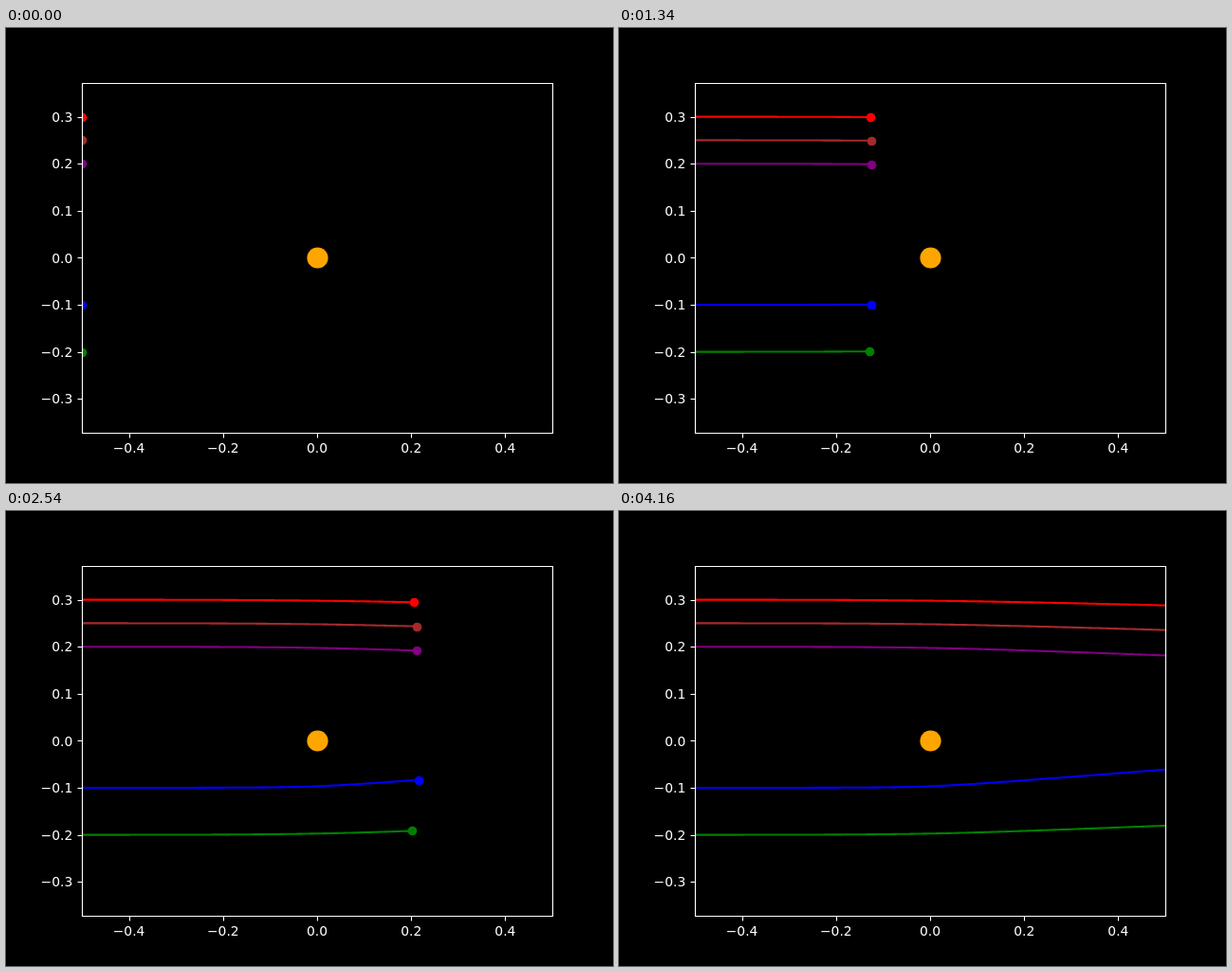
An HTML page that plays this animation: 640 px wide and 480 px high, repeating every 8710 ms.

```html
<!DOCTYPE html>
<html lang="en">
<head>
<meta charset="utf-8">
<title>Deflected particles</title>
<style>
  html, body { margin: 0; width: 100%; height: 100%; overflow: hidden; background: #000; }
  svg { display: block; width: 640px; height: 480px; }
  text { font: 13.889px "DejaVu Sans", sans-serif; fill: #fff; }
  .axes { fill: none; stroke: #fff; stroke-width: 1.11; }
  .trail { fill: none; stroke-width: 2.083; stroke-linejoin: round; stroke-linecap: square; }
</style>
</head>
<body>
<svg viewBox="0 0 640 480">
  <clipPath id="area"><rect x="80" y="58" width="496" height="369"/></clipPath>
  <g id="plot" clip-path="url(#area)"></g>
  <path id="frame" class="axes" d="M80.5 58.5H576.5V427.5H80.5Z"/>
  <g id="ticks"></g>
</svg>
<script>
const STEP = 20, LOOP = 8710, LAST = 208;
const SCALE = 496, X0 = 328, Y0 = 242.4, HALF = 0.5;

// Distance travelled in px at the key steps; b = start height, k = pull strength
const KEYS = [0, 39, 67, 88, 104, 127, 158, 190];
const particles = [
  { color: 'red',    b: 0.3,  k: 0.0042,  dist: [0, 108.1, 185.2, 242.4, 286, 350, 435.2, 523.4] },
  { color: 'green',  b: -0.2, k: 0.0042,  dist: [0, 108.1, 184.4, 241.5, 285, 348.2, 434, 522.2] },
  { color: 'blue',   b: -0.1, k: 0.00395, dist: [0, 108.3, 186.1, 246, 291.1, 355, 441, 529.4] },
  { color: 'purple', b: 0.2,  k: 0.00398, dist: [0, 108.3, 185.8, 244.3, 289, 353, 439, 527.4] },
  { color: 'brown',  b: 0.25, k: 0.00405, dist: [0, 108.2, 185.8, 244.3, 289, 353, 439, 527.4] }
];

const $ = id => document.getElementById(id);

function add(parent, name, attrs, text) {
  const el = document.createElementNS('http://www.w3.org/2000/svg', name);
  for (const key in attrs) el.setAttribute(key, attrs[key]);
  if (text) el.textContent = text;
  return parent.appendChild(el);
}

const snap = v => Math.floor(v + 0.5) + 0.5;
const label = v => v.toFixed(1).replace('-', '\u2212');

function travelled(dist, n) {
  let i = 1;
  while (i < KEYS.length - 1 && n > KEYS[i]) i++;
  const f = (n - KEYS[i - 1]) / (KEYS[i] - KEYS[i - 1]);
  return dist[i - 1] + (dist[i] - dist[i - 1]) * f;
}

// Path of a fast body bent slightly by a central inverse-square pull
function height(b, k, x) {
  const r0 = Math.hypot(HALF, b);
  return b - k / b * (Math.hypot(x, b) - r0 + (x + HALF) * HALF / r0);
}

function drawTicks() {
  const g = $('ticks');
  for (let i = -2; i <= 2; i++) {
    const x = X0 + i * 0.2 * SCALE;
    add(g, 'path', { class: 'axes', d: `M${snap(x)} 427.5v5` });
    add(g, 'text', { x, y: 448, 'text-anchor': 'middle' }, label(i * 0.2));
  }
  for (let i = -3; i <= 3; i++) {
    const y = Y0 - i * 0.1 * SCALE;
    add(g, 'path', { class: 'axes', d: `M80.5 ${snap(y)}h-5` });
    add(g, 'text', { x: 70.3, y: Math.round(y + 5.2), 'text-anchor': 'end' }, label(i * 0.1));
  }
}

function build() {
  const plot = $('plot');
  add(plot, 'circle', { cx: snap(X0), cy: snap(Y0), r: 11.1, fill: 'orange' });
  for (const p of particles) {
    p.points = [];
    for (let n = 0; n <= LAST; n++) {
      const px = 80 + travelled(p.dist, n);
      p.points.push([px, Y0 - SCALE * height(p.b, p.k, (px - X0) / SCALE)]);
    }
    p.trail = add(plot, 'polyline', { class: 'trail', stroke: p.color });
    p.dot = add(plot, 'circle', { r: 4.86, fill: p.color });
  }
}

let shown = -1;

function draw(now) {
  const n = Math.min(LAST, Math.floor(now % LOOP / STEP));
  if (n !== shown) {
    shown = n;
    for (const p of particles) {
      const [x, y] = p.points[n];
      p.trail.setAttribute('points', n ? p.points.slice(0, n + 1).join(' ') : '');
      p.dot.setAttribute('cx', snap(x));
      p.dot.setAttribute('cy', snap(y));
    }
  }
  requestAnimationFrame(draw);
}

drawTicks();
build();
draw(0);
</script>
</body>
</html>
```
